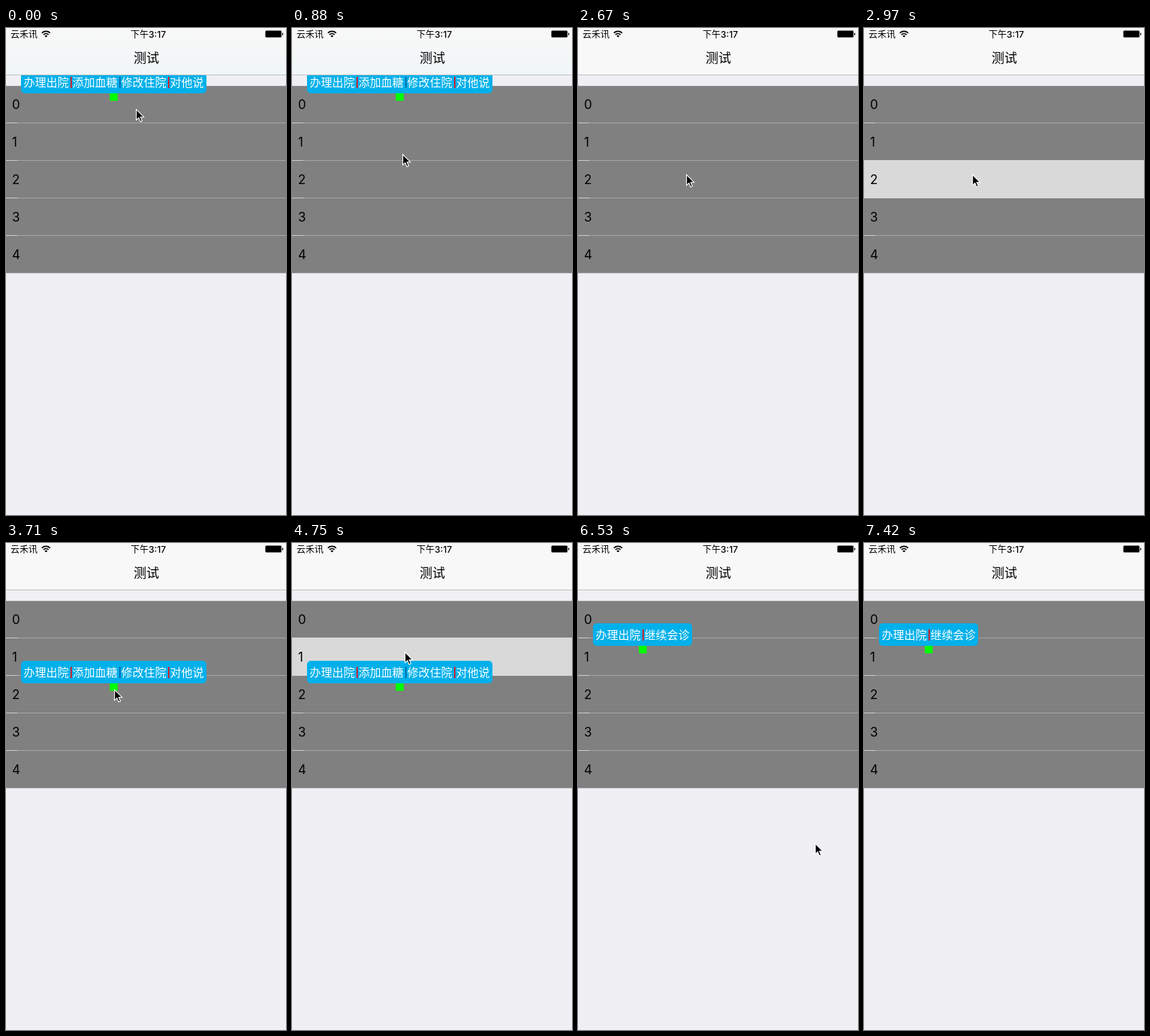
An HTML page for the animation above (8.47 s loop, 373 by 649 pixels).

```html
<!DOCTYPE html>
<html lang="zh-CN">
<head>
<meta charset="utf-8">
<style>
html, body { margin: 0; width: 100%; height: 100%; overflow: hidden; background: #efeff4; }
svg { display: block; width: 373px; height: 649px; }
text { font-family: Inter, "Noto Sans CJK SC", "Noto Sans CJK", sans-serif; }
.menu text { font-size: 15px; font-weight: 300; fill: #fff; }
</style>
</head>
<body>
<svg viewBox="0 0 373 649">
  <defs>
    <linearGradient id="glow" x1="0" y1="0" x2="0" y2="1">
      <stop offset="0" stop-color="#00b0ea" stop-opacity="0"/>
      <stop offset="1" stop-color="#00b0ea" stop-opacity=".03"/>
    </linearGradient>
  </defs>
  <rect width="373" height="649" fill="#efeff4"/>
  <g id="rows"></g>
  <g id="menus"></g>

  <rect width="373" height="62" fill="#f8f8f8"/>
  <rect id="tint" width="373" height="62" fill="url(#glow)"/>
  <rect y="62" width="373" height="1" fill="#c4c4c6"/>
  <text x="6" y="12.5" font-size="12">云禾讯</text>
  <g fill="none" stroke="#000" stroke-width="1.7">
    <path d="M47.8 6.6a8 8 0 0 1 11 0M49.9 8.9a5 5 0 0 1 6.8 0"/>
    <path d="M53.3 12.6L51.3 10.6a2.9 2.9 0 0 1 4 0Z" fill="#000" stroke="none"/>
  </g>
  <text x="189.5" y="12.5" font-size="12" font-weight="500" text-anchor="middle">下午3:17</text>
  <rect x="345.5" y="3.5" width="21.5" height="9" rx="1.5" fill="#000" stroke="#777" stroke-width=".6"/>
  <path d="M368 6.2q1.4 .4 1.4 1.8t-1.4 1.8z"/>
  <text x="187" y="46" font-size="17" font-weight="500" text-anchor="middle">测试</text>

  <path id="cursor" d="M.6 .6V14.6L3.8 11.6 6 16.8 8.4 15.8 6.2 10.7H10.6Z" stroke="#fff" stroke-width="1.1"/>
</svg>
<script>
const LOOP = 8470, STEPS = 57;
const $ = id => document.getElementById(id);
const rect = (x, y, w, h, fill, extra = '') =>
  `<rect x="${x}" y="${y}" width="${w}" height="${h}" fill="${fill}" ${extra}/>`;

// list
let list = rect(0, 77, 373, 249.5, '#808080') + rect(0, 77, 373, .5, '#b0b0b2');
for (let i = 0; i < 5; i++) {
  const y = 126 + i * 50;
  list += rect(0, y, 373, 1, '#a5a5a7') + (i < 4 ? rect(0, y, 15, 1, '#cbcbcb') : '');
}
list += rect(0, 126, 373, 51, '#d9d9d9', 'id="lit"');
for (let i = 0; i < 5; i++) list += `<text x="8" y="${108 + i * 50}" font-size="17">${i}</text>`;
$('rows').innerHTML = list;

// pop-up menus
function menu(id, labels, width, arrowX) {
  let s = rect(20, 0, width, 30, '#00b0ea', 'rx="5"') + rect(arrowX, 30, 10.5, 10, '#0f0');
  labels.forEach((label, i) => {
    const x = 23.5 + i * 65;
    if (i) s += rect(x - 2.5, 8, 1.5, 15, i % 2 ? '#f00' : '#0a5f9e');
    s += `<text x="${x}" y="20.7">${label}</text>`;
  });
  return `<g class="menu" id="${id}">${s}</g>`;
}
$('menus').innerHTML =
  menu('long', ['办理出院', '添加血糖', '修改住院', '对他说'], 247, 138.2) +
  menu('short', ['办理出院', '继续会诊'], 132, 81);

// cursor stops: step, x, y
const path = [
  [0, 173, 108], [2, 171, 150], [4, 160, 193], [6, 147, 168], [8, 139, 125],
  [11, 114, 76], [12, 112, 72], [13, 114, 78], [16, 172, 230], [18, 144, 195],
  [26, 144, 195], [29, 153, 155], [30, 150, 145], [40, 150, 145],
  [43, 270, 310], [45, 361, 490], [48, 282, 640], [49, 289, 643], [50, 300, 670]
];
function cursorAt(k) {
  const i = path.findIndex(p => p[0] > k);
  if (i < 0) return path[path.length - 1].slice(1);
  const a = path[i - 1], b = path[i], u = (k - a[0]) / (b[0] - a[0]);
  return [1, 2].map(j => a[j] + (b[j] - a[j]) * u);
}

const show = (id, on) => $(id).setAttribute('visibility', on ? 'visible' : 'hidden');
const move = (id, x, y) => $(id).setAttribute('transform', `translate(${x} ${y})`);

function draw(now) {
  const k = Math.floor((now % LOOP) / LOOP * STEPS + .1);
  const top = k < 13, row2 = k >= 20 && k < 25, row1 = k >= 32 && k < 38;
  show('tint', top);
  show('long', top || (k >= 25 && k < 38));
  move('long', 0, top ? 57 : 157);
  show('short', k >= 38);
  move('short', 0, 107);
  show('lit', row1 || row2);
  move('lit', 0, row2 ? 50 : 0);
  move('cursor', ...cursorAt(k));
}
function tick(now) {
  draw(now);
  requestAnimationFrame(tick);
}
draw(0);
requestAnimationFrame(tick);
</script>
</body>
</html>
```
